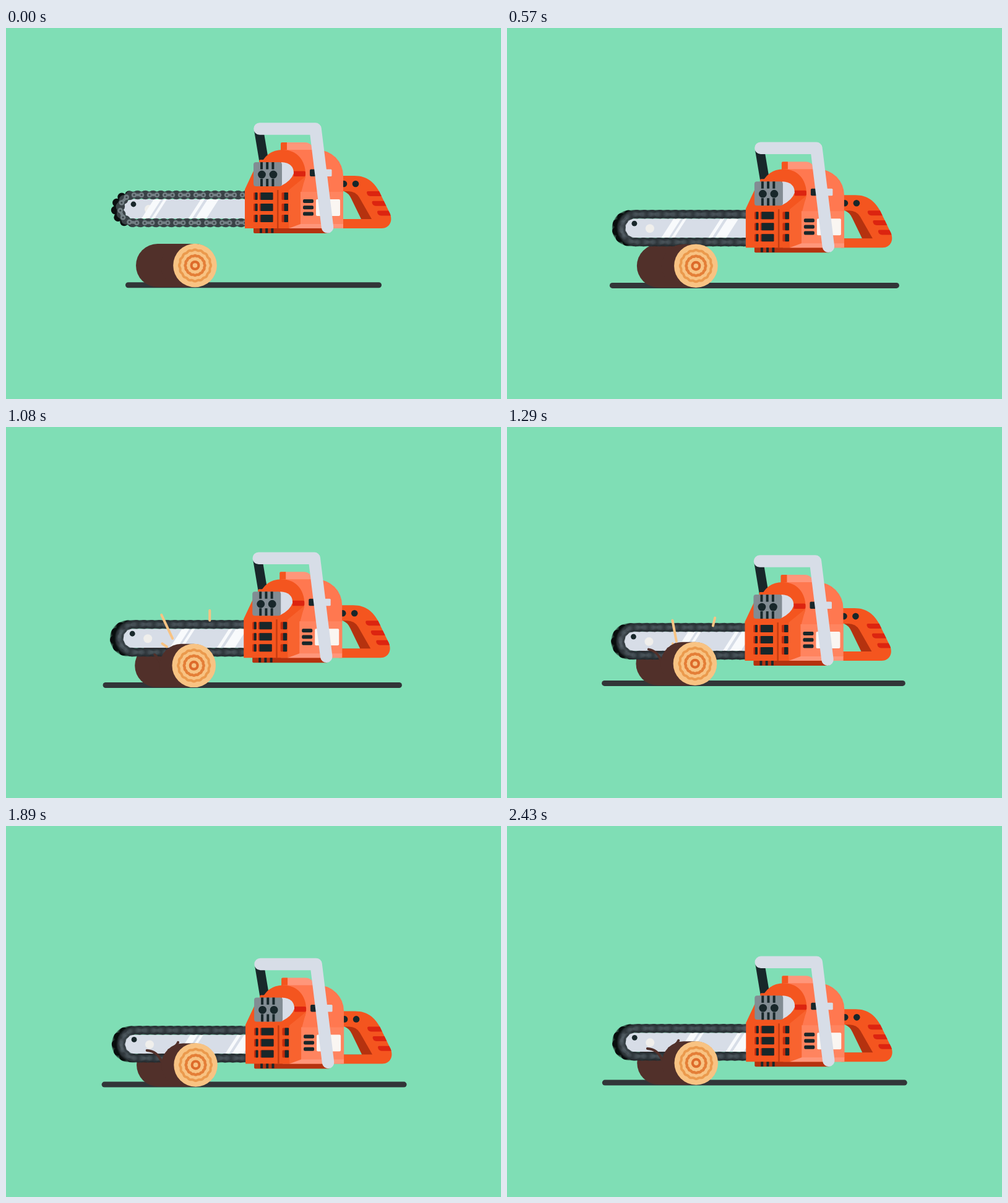
An HTML page with a canvas for the animation above (2.46 s loop, 800 by 600 pixels).

```html
<!DOCTYPE html>
<html lang="en">
<head>
<meta charset="utf-8">
<title>Chainsaw</title>
<style>
html, body { margin: 0; width: 100%; height: 100%; overflow: hidden; background: #7fdeb5; }
canvas { display: block; }
</style>
</head>
<body>
<canvas id="stage" width="800" height="600"></canvas>
<script>
const ctx = document.getElementById('stage').getContext('2d');
const LOOP = 2460, STEP = 30, TAU = Math.PI * 2;
const GREEN = '#7fdeb5', ORANGE = '#f4551f', SALMON = '#ff7850', PALE = '#ff967a', RED = '#dc2410',
  RUST = '#b5320f', BLACK = '#18272a', SILVER = '#d7dde7', BARK = '#51302a', WOOD = '#f8c383';

// Progress from 0 to 1 over a span of time, plain and eased.
const ramp = (t, start, length) => Math.min(1, Math.max(0, (t - start) / length));
const ease = (t, start, length) => {
  const v = ramp(t, start, length);
  return v * v * (3 - 2 * v);
};
const wave = (t, peak, period) => Math.cos(TAU * (t - peak) / period);

// The saw lifts a little, drops onto the log, then cuts into it.
const sawDrop = t => 30.5 * ease(t, 200, 340) - 8 * Math.sin(Math.PI * ramp(t, 60, 300)) + 27.5 * ease(t, 560, 900);
const groundHalf = t => 207 + 27 * ease(t, 60, 460) + 12.5 * ease(t, 560, 900);
function shake(t) {
  const power = ramp(t, 270, 1000);
  return [power * (-.3 - 1.9 * wave(t, 1080, 185)), power * 2.4 * wave(t, 1890, 164)];
}

function fill(color, path) {
  ctx.fillStyle = color;
  ctx.fill(new Path2D(path));
}
function line(color, width, path, cap = 'round') {
  ctx.strokeStyle = color;
  ctx.lineWidth = width;
  ctx.lineCap = cap;
  ctx.lineJoin = 'round';
  ctx.stroke(new Path2D(path));
}
function box(color, x, y, w, h, r = 0) {
  ctx.fillStyle = color;
  ctx.beginPath();
  ctx.roundRect(x, y, w, h, r);
  ctx.fill();
}
function disc(color, x, y, r) {
  ctx.fillStyle = color;
  ctx.beginPath();
  ctx.arc(x, y, r, 0, TAU);
  ctx.fill();
}

// Point on the chain loop: top run, round tip, bottom run.
const RUN = 185, R = 22.5, TIP = Math.PI * R, PITCH = 25;
function onChain(s) {
  if (s < RUN) return [392 - s, 270];
  if (s > RUN + TIP) return [207 + s - RUN - TIP, 315];
  const a = (s - RUN) / R;
  return [207 - R * Math.sin(a), 292.5 - R * Math.cos(a)];
}

function drawChain(phase) {
  const links = (pitch, draw) => {
    for (let s = phase % pitch; s < 2 * RUN + TIP; s += pitch) draw(s);
  };
  links(PITCH / 2, s => {
    const [x, y] = onChain(s + 6);
    disc('#0b0f10', x - 8, y, 6.8);
  });
  line('#394246', 11, 'M392 270H207A22.5 22.5 0 0 0 207 315H392');
  links(PITCH / 2, s => disc('#394246', ...onChain(s), 7.3));
  links(PITCH, s => {
    const ends = [onChain(s - 6), onChain(s + 6)];
    line('#737f84', 4.5, `M${ends[0]}L${ends[1]}`);
    for (const [x, y] of ends) {
      disc('#737f84', x, y, 4.3);
      disc('#394246', x, y, 1.5);
    }
  });
}

function drawBar(t, glint) {
  ctx.save();
  ctx.beginPath();
  ctx.roundRect(190, 277, 220, 31, 15.5);
  ctx.clip();
  box(SILVER, 190, 277, 220, 31);
  disc('#f0efec', 231, 293, 7);
  for (const [x, w] of [[219, 12], [235, 5], [295, 6], [306, 18]])
    fill('#f8fafc', `M${x + glint} 308h${w}l20 -31h${-w}z`);
  ctx.restore();
  disc(BLACK, 206, 285, 4.4);

  // Spin-up, then constant speed with motion blur.
  const spin = ramp(t, 30, 300), blur = 13 * spin;
  const travel = t < 330 ? 150 * spin * spin : t - 180;
  const samples = blur ? 8 : 1;
  for (let i = 0; i < samples; i++) {
    ctx.globalAlpha = 1 / (i + 1);
    drawChain(4 + travel + blur * i / samples);
  }
  ctx.globalAlpha = 1;
}

function drawRearHandle() {
  const shape = 'M540 239H563C584 239 595 250 603 264L619 297C627 311 620 324 607 324H540Z';
  fill(ORANGE, shape);
  ctx.save();
  ctx.clip(new Path2D(shape));
  for (let i = 0; i < 3; i++) box(RED, 583 + 8.5 * i, 264 + 15.7 * i, 50, 8, [2, 0, 0, 6]);
  ctx.restore();
  fill(RUST, 'M540 264H553Q565 264 571 274L591 309H540Z');
  fill(GREEN, 'M540 264H546Q554 267 558 276L574 309H540Z');
  disc(BLACK, 546, 252, 5.3);
  disc(BLACK, 565, 252, 5.3);
}

function drawHousing() {
  line(BLACK, 15, 'M408.5 165L418 222', 'butt');
  box(RUST, 400, 320, 122, 12, 2);

  box(PALE, 446, 185, 51, 20, [0, 14, 0, 0]);
  box(ORANGE, 444, 185, 10, 20, [2, 0, 0, 0]);
  fill(SALMON, 'M446 197H503A42 42 0 0 1 545 239V324H446Z');
  fill(ORANGE, 'M410 225Q420 197 447 197C470 197 484 214 484 236Q484 252 470 262H405Z');
  box(ORANGE, 409, 213, 11, 8, 2);
  fill(ORANGE, 'M386 324V261L401 229H446L476 264V324Z');
  fill('#f8632f', 'M457 262L484 240L477 266V317L457 324Z');
  box('#ff845f', 476, 265, 69, 53);
  fill(PALE, 'M476 317H545V324H457Z');
  box('#c43d12', 438, 262, 2.5, 62);
}

function drawDetails() {
  fill(SILVER, 'M445 217Q465 218 465 235Q461 247 445 255Z');
  box(RED, 465, 231.5, 19, 8.5, [0, 2, 2, 0]);

  box('#828c93', 400, 217, 46, 39, 4);
  for (let i = 0; i < 3; i++) {
    const x = 411 + 9.2 * i, y = 266 + 18 * i;
    box(BLACK, x, 217, 4, 11.5);
    box(BLACK, x, 244, 4, 12);
    box(BLACK, x - 1, 324, 4, 7.5);
    for (const [left, width, shade] of [[400, 6.5, 2.5], [409.5, 22, 2], [445.5, 10.5, 4]]) {
      box('#c32c0d', left, y, width, 12, 1.5);
      box(BLACK, left + shade, y, width - shade, 12, 1);
    }
    box(BLACK, 480, 277 + 10.2 * i, 17, 6, 2);
  }
  disc(BLACK, 413.5, 237, 6.4);
  disc(BLACK, 432, 237, 6.4);

  box('#faf6f2', 501, 277, 39, 27, 2);
  box(BLACK, 491, 228.5, 10, 11.5, 2);
  line(SILVER, 19.5, 'M410 163H500L519.5 322');
  box(SILVER, 500, 228.5, 26.5, 11.5, 1.5);
}

// A stroke that grows from its start.
function curl(path, length, amount) {
  if (!amount) return;
  ctx.setLineDash([length * amount, 200]);
  line(BARK, 4, path);
  ctx.setLineDash([]);
}

// Three bursts; each chip grows, flies along its angle and shrinks.
function drawSplinters(t) {
  for (let burst = -1; burst <= 1; burst++) {
    const age = ramp(t, 950 + burst * 260, 260), length = Math.sin(Math.PI * age);
    if (length < .01) continue;
    for (const [x, y, angle, size] of [[276, 351, -2.01, 42], [331, 336, -1.57, 16], [285, 370, -2.53, 9]]) {
      ctx.save();
      ctx.translate(x, y);
      ctx.rotate(angle + burst * .25);
      line(WOOD, 4, `M${66 * age - size * length / 2} 0h${size * length}`);
      ctx.restore();
    }
  }
}

function ring(color, radius, width) {
  ctx.beginPath();
  for (let a = 0; a < TAU; a += TAU / 120) {
    const r = radius + radius * .025 * Math.cos(a * 16);
    ctx.lineTo(305.5 + r * Math.cos(a), 384 + r * Math.sin(a));
  }
  ctx.closePath();
  ctx.strokeStyle = color;
  ctx.lineWidth = width;
  ctx.stroke();
}

function drawLogFront() {
  box(BARK, 250, 349, 90, 70, 35);
  disc(WOOD, 305.5, 384, 35.3);
  ring('#eb9a4d', 25, 4);
  ring('#e47f38', 15.6, 4.4);
  disc('#dd6b2b', 305.5, 384, 8);
  disc(WOOD, 305.5, 384, 3.8);
}

function draw(t) {
  const drop = sawDrop(t), half = groundHalf(t) - 4.5;
  ctx.fillStyle = GREEN;
  ctx.fillRect(0, 0, 800, 600);
  ctx.save();
  ctx.translate(...shake(t));
  line('#323538', 9, `M${400 - half} 415.7H${400 + half}`);
  box(BARK, 210, 349, 130, 70, 35);

  ctx.save();
  ctx.translate(0, drop);
  drawBar(t, drop);
  drawRearHandle();
  drawHousing();
  drawDetails();
  ctx.restore();

  curl('M250 378Q243 361 226 360.5', 31, ramp(t, 850, 500));
  curl('M262 360Q274 355 277 347.5', 21, ramp(t, 1080, 320));
  drawSplinters(t);
  drawLogFront();
  ctx.restore();
}

function tick() {
  draw(Math.floor(performance.now() % LOOP / STEP) * STEP);
  requestAnimationFrame(tick);
}
tick();
</script>
</body>
</html>
```
